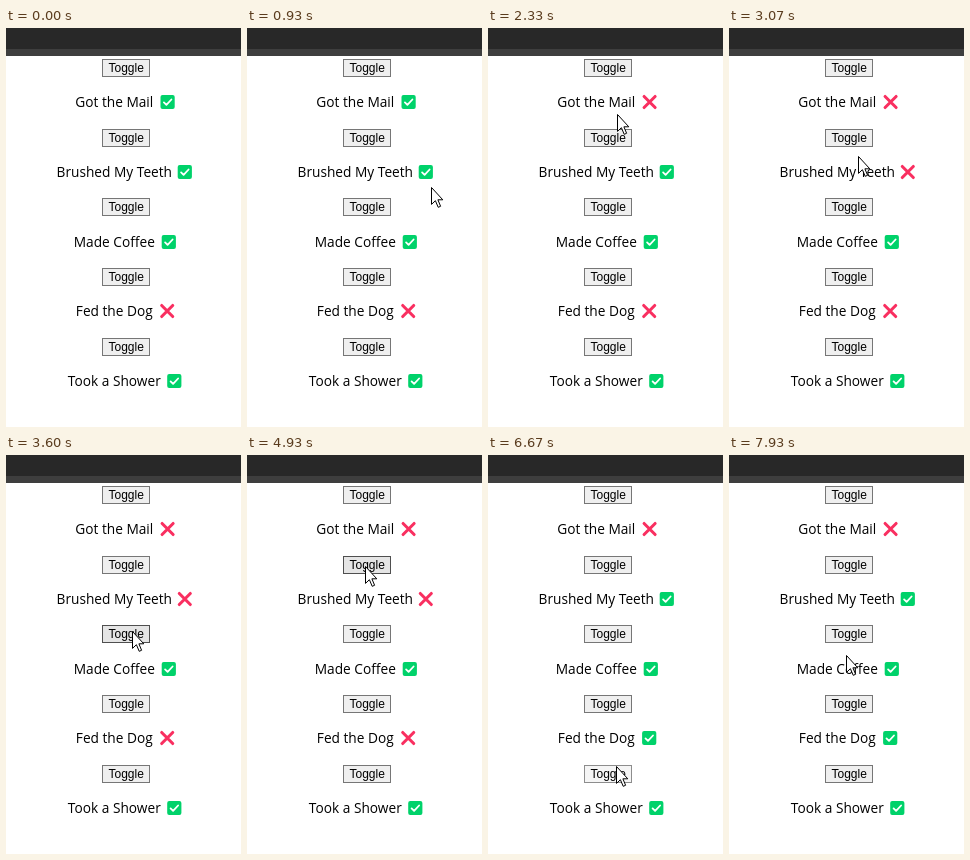
These frames come from a looping animation (235 px wide and 399 px high, 8000 ms). An HTML page:

```html
<!DOCTYPE html>
<html lang="en">
<head>
<meta charset="utf-8">
<title>Toggle list</title>
<style>
  html, body { margin: 0; width: 100%; height: 100%; overflow: hidden; background: #fff; }
  svg { display: block; }
  text { text-anchor: middle; fill: #000; }
  .label { font: 13.7px "Open Sans", "Noto Sans", sans-serif; }
  .button text { font: 12px "Liberation Sans", Arial, sans-serif; }
  .button rect { fill: #efefef; stroke: #767676; }
  .button.hover rect { fill: #e5e5e5; stroke: #4f4f4f; }
  .button.active rect { fill: #f5f5f5; stroke: #8d8d8d; }
</style>
</head>
<body>
<svg width="235" height="399" viewBox="0 0 235 399">
  <defs>
    <g id="yes">
      <rect x="-7.1" y="-7.1" width="14.2" height="14.2" rx="2"/>
      <path d="M-3.7 .4L-1.2 2.9L3.8 -2.5" fill="none" stroke="#fff" stroke-width="1.8" stroke-linecap="round" stroke-linejoin="round"/>
    </g>
    <path id="no" d="M-5.5 -5.5L5.5 5.5M5.5 -5.5L-5.5 5.5" stroke="#f92f60" stroke-width="3.1" stroke-linecap="round"/>
  </defs>
  <rect width="235" height="21" fill="#282828"/>
  <rect y="21" width="235" height="7" fill="#3e3e3e"/>
  <g id="rows" fill="#00d26a"></g>
  <path id="cursor" d="M.5 .5V17.4L4.4 13.7L7.2 20.3L9.6 19.3L6.9 12.8H11.8Z" fill="#fff" stroke="#000"/>
</svg>
<script>
const LOOP = 8000, TICKS = 120, STEP = LOOP / TICKS;
const PITCH = 69.7, HOLD = 2;

const rows = [
  { text: "Got the Mail", iconX: 161.6, done: true },
  { text: "Brushed My Teeth", iconX: 178.8, done: true },
  { text: "Made Coffee", iconX: 162.8, done: true },
  { text: "Fed the Dog", iconX: 161.2, done: false },
  { text: "Took a Shower", iconX: 168.3, done: true },
];

// Straight cursor moves: start tick, end tick, x and y reached
const entry = [236, 360];
const moves = [
  [4, 14, 184, 159], [14, 17, 154, 88], [17, 21, 127, 47],
  [31, 38, 130, 116], [44, 54, 126, 176], [69, 74, 118, 111],
  [78, 86, 126, 257], [91, 97, 128, 311], [110, 115, 117, 200],
];
const presses = [29, 42, 55, 64, 76, 89, 99, 104];

const topOf = i => Math.round(31 + PITCH * i);

function cursorAt(tick) {
  let [x, y] = entry;
  for (const [from, to, toX, toY] of moves) {
    const k = Math.min(1, Math.max(0, (tick - from) / (to - from)));
    x += (toX - x) * k;
    y += (toY - y) * k;
  }
  return [Math.round(x), Math.round(y)];
}

// Index of the button under the cursor, or -1
function hoveredRow(tick) {
  const [x, y] = cursorAt(tick);
  return rows.findIndex((_, i) => x >= 96 && x < 144 && y >= topOf(i) && y < topOf(i) + 18);
}

const clicks = presses.map(at => ({ at, row: hoveredRow(at) }));

const cursor = document.getElementById("cursor");
const list = document.getElementById("rows");
list.innerHTML = rows.map(({ text, iconX }, i) => {
  const top = topOf(i), baseline = Math.round(79.3 + PITCH * i);
  return `
    <g class="button">
      <rect x="96.5" y="${top + .5}" width="47" height="17"/>
      <text x="120.2" y="${top + 13}">Toggle</text>
    </g>
    <text class="label" x="108.3" y="${baseline}">${text}</text>
    <use x="${iconX}" y="${baseline - 5}"/>`;
}).join("");
const buttons = list.querySelectorAll(".button");
const icons = list.querySelectorAll("use");

function draw(time) {
  const tick = Math.floor((time % LOOP + 4) / STEP) % TICKS;
  const hovered = hoveredRow(tick);
  cursor.setAttribute("transform", `translate(${cursorAt(tick)})`);
  rows.forEach((row, i) => {
    const past = clicks.filter(c => c.row === i && tick >= c.at);
    const flips = past.filter(c => tick >= c.at + HOLD).length;
    const state = past.length > flips ? "active" : hovered === i ? "hover" : "";
    const done = row.done !== (flips % 2 === 1);
    buttons[i].setAttribute("class", `button ${state}`);
    icons[i].setAttribute("href", done ? "#yes" : "#no");
  });
}

const start = performance.now();
function loop() {
  draw(performance.now() - start);
  requestAnimationFrame(loop);
}
loop();
</script>
</body>
</html>
```
